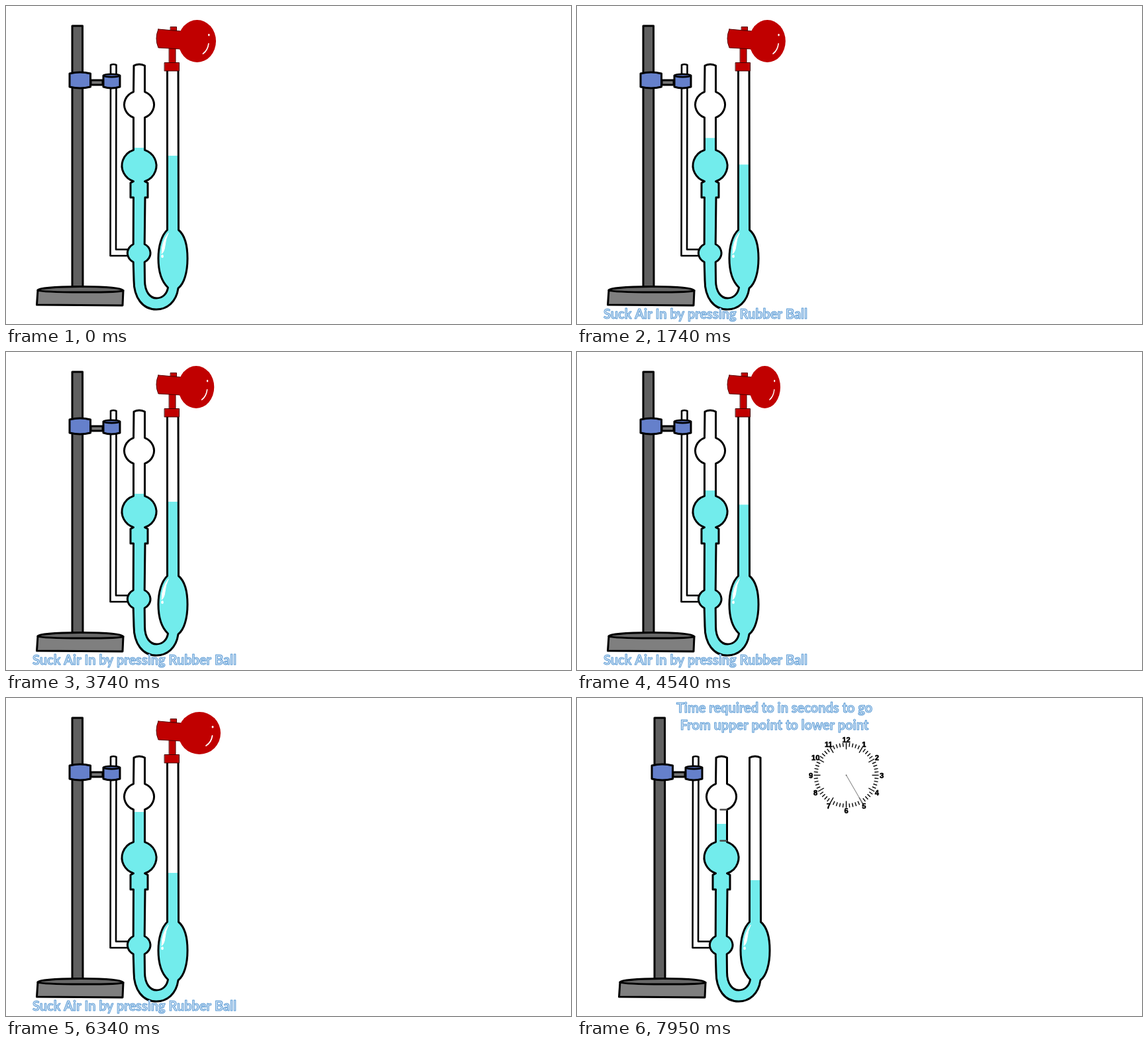
Write an HTML page with a canvas that moves like this. It is 853 px wide and 480 px high and loops after 8000 ms.

```html
<!DOCTYPE html>
<html lang="en">
<head>
<meta charset="utf-8">
<title>Viscometer</title>
<style>
html, body { margin: 0; width: 100%; height: 100%; overflow: hidden; background: #fff; }
canvas { display: block; }
</style>
</head>
<body>
<canvas id="stage" width="853" height="480"></canvas>
<script>
const ctx = document.getElementById('stage').getContext('2d');
const LOOP = 8000, REPLAY = 3440, PERIOD = 3140, CUT = 6540, TIMER = 7150, HOLD = 200;
const LIQUID = '#72ecec', RED = '#c00000', BLUE = '#6580cb', OUTLINE = '#5b9bd5';

const clamp = v => Math.max(0, Math.min(1, v));
const ramp = (t, from, to) => clamp((t - from) / (to - from));
const hold = (t, origin) => origin + Math.floor((t - origin) / HOLD) * HOLD;

function shape(path, fill, width = 3, stroke = '#000') {
  const p = new Path2D(path);
  if (fill) { ctx.fillStyle = fill; ctx.fill(p); }
  if (width) { ctx.lineWidth = width; ctx.strokeStyle = stroke; ctx.stroke(p); }
}

// Right or left half of a bulb, joined to a tube of half width 8.5
function bulb(p, x, y, rx, ry, left) {
  const a = Math.acos(8.5 / rx);
  p.ellipse(x, y, rx, ry, 0, left ? Math.PI - a : -a, left ? Math.PI + a : a);
}

function makeGlass() {
  const p = new Path2D();
  const line = (...pts) => { for (let i = 0; i < pts.length; i += 2) p.lineTo(pts[i], pts[i + 1]); };
  p.moveTo(193, 90);
  p.quadraticCurveTo(201, 86, 209.5, 90);
  bulb(p, 201, 149, 22.5, 21);
  bulb(p, 201, 241, 26, 25);
  line(214, 267, 214, 289, 210, 289);
  bulb(p, 200.7, 373, 17.3, 15.5);
  line(209.5, 414);
  p.bezierCurveTo(209.5, 432, 218, 441, 227, 441);
  p.bezierCurveTo(236, 441, 243, 435, 244.5, 425);
  p.bezierCurveTo(234, 415, 230, 400, 230, 381);
  p.bezierCurveTo(230, 362, 235, 346, 243.5, 338);
  line(243.5, 90);
  p.quadraticCurveTo(252, 86, 260, 90);
  line(260.5, 338);
  p.bezierCurveTo(270, 346, 274, 362, 274, 381);
  p.bezierCurveTo(274, 402, 269, 419, 260, 426);
  p.bezierCurveTo(257, 447, 243, 458, 227, 458);
  p.bezierCurveTo(206, 458, 193, 440, 193, 414);
  bulb(p, 200.7, 373, 17.3, 15.5, true);
  line(192.5, 289, 188, 289, 188, 267);
  bulb(p, 201, 241, 26, 25, true);
  bulb(p, 201, 149, 22.5, 21, true);
  p.closePath();
  return p;
}
const glass = makeGlass();

function drawStand() {
  shape('M100 30H115.5L116 424H100Z', '#606060');
  shape('M48 429L46.5 451L176 452L177 429.5Z', '#7f7f7f');
  shape('M48 429C52 422 172 421 177 429.5C172 433 56 433 48 429Z', '#686868');
  shape('M128 112H146V119H128Z', '#777');
  shape('M158 89Q162 87 166.5 89L166 367.5H184M158 89L157.5 377H184', null, 2.6);
  shape('M96 102Q112 98 127.5 102V122Q112 126 96 122Z', BLUE);
  shape('M147 105V122Q159 126 172 122V105Z', BLUE);
  shape('M147 105C149 102 170 102 172 105C170 108 149 108 147 105Z', '#465996', 2.4);
}

function drawGlass(left, right) {
  ctx.save();
  ctx.clip(glass);
  ctx.fillStyle = LIQUID;
  ctx.fillRect(170, left, 57, 480 - left);
  ctx.fillRect(227, right, 55, 480 - right);
  ctx.restore();
  ctx.lineWidth = 3;
  ctx.strokeStyle = '#000';
  ctx.stroke(glass);
  shape('M245 343Q235 355 235 374Q239 371 240 362Q241 351 245 343Z', '#fff', 1, '#fff');
  shape('M236 377V378.5', null, 3.6, '#fff');
}

function drawBall(w) {
  shape('M248.5 31.5H257.5V37H248.5Z', RED, 1, '#500');
  shape('M246.5 64H256V86H246.5Z', RED, 1, '#500');
  shape('M239.5 85.5H261.5V98H239.5Z', RED, 1, '#400');
  shape('M230 35L264 38V65L230 63Q224 49 230 35Z', RED, 1, '#500');
  ctx.fillStyle = RED;
  ctx.beginPath();
  ctx.ellipse(260 + w / 2, 53, w / 2, 32, 0, 0, Math.PI * 2);
  ctx.fill();
  ctx.save();
  ctx.translate(260, 0);
  ctx.scale(w / 64, 1);
  shape('M51.5 57Q50 67 42 72', null, 1.8, '#fff');
  shape('M52 43.5V44', null, 2.8, '#fff');
  ctx.restore();
}

function caption(text, x, y, alpha) {
  ctx.save();
  ctx.globalAlpha = alpha;
  ctx.font = 'bold 20px Lato, Carlito, sans-serif';
  ctx.textAlign = 'center';
  ctx.fillStyle = '#cfe2f4';
  ctx.fillText(text, x, y);
  ctx.lineWidth = 1;
  ctx.strokeStyle = OUTLINE;
  ctx.strokeText(text, x, y);
  ctx.restore();
}

function drawClock(angle) {
  ctx.save();
  ctx.translate(406.5, 116.5);
  ctx.font = 'bold 11px "Liberation Sans", Arial, sans-serif';
  ctx.textAlign = 'center';
  ctx.lineCap = 'butt';
  ctx.fillStyle = ctx.strokeStyle = '#000';
  for (let i = 1; i <= 60; i++) {
    const a = i * Math.PI / 30, s = Math.sin(a), c = -Math.cos(a);
    const inner = i % 5 ? 43 : 39;
    ctx.lineWidth = 1.4;
    ctx.beginPath();
    ctx.moveTo(s * inner, c * inner);
    ctx.lineTo(s * 49, c * 49);
    ctx.stroke();
    if (i % 5 === 0) {
      ctx.lineWidth = 0.6;
      ctx.fillText(i / 5, s * 53.5, c * 53.5 + 4);
      ctx.strokeText(i / 5, s * 53.5, c * 53.5 + 4);
    }
  }
  ctx.rotate(angle);
  shape('M0 0V-48', null, 1.1, '#8c8c8c');
  ctx.fillStyle = '#555';
  ctx.fillRect(-0.8, -0.8, 1.6, 1.6);
  ctx.restore();
}

// The ball is squeezed, then springs back while the liquid climbs; played twice
function pressScene(t) {
  const step = t < 740 ? t : hold(t, 740);
  const p = step < REPLAY ? step : step - PERIOD;
  const rise = ramp(p, 1230, 2680);
  drawStand();
  drawGlass(214 - 42 * rise, 226 + 38 * rise);
  drawBall(57 - 10 * ramp(p, 300, 1400) + 17 * ramp(p, 1400, 2140));
  caption('Suck Air In by pressing Rubber Ball', 194, 472, ramp(t, 60, 740));
}

function timeScene(t) {
  const k = ramp(hold(t, TIMER), TIMER, TIMER + 4 * HOLD);
  const alpha = ramp(t, CUT, TIMER);
  ctx.save();
  ctx.translate(17, 0);
  drawStand();
  drawGlass(167 + 23 * k, 290 - 15 * k);
  shape('M199.5 168.5H209M199.5 215.5H209', null, 2.4, '#484848');
  ctx.restore();
  caption('Time required to in seconds to go', 298, 22, alpha);
  caption('From upper point to lower point', 298, 48, alpha);
  drawClock(k * Math.PI * 5 / 6);
}

let start;
function frame(now) {
  start ??= now;
  const t = (now - start) % LOOP;
  ctx.fillStyle = '#fff';
  ctx.fillRect(0, 0, 853, 480);
  ctx.lineJoin = ctx.lineCap = 'round';
  if (t < CUT) pressScene(t); else timeScene(t);
  requestAnimationFrame(frame);
}
requestAnimationFrame(frame);
</script>
</body>
</html>
```
